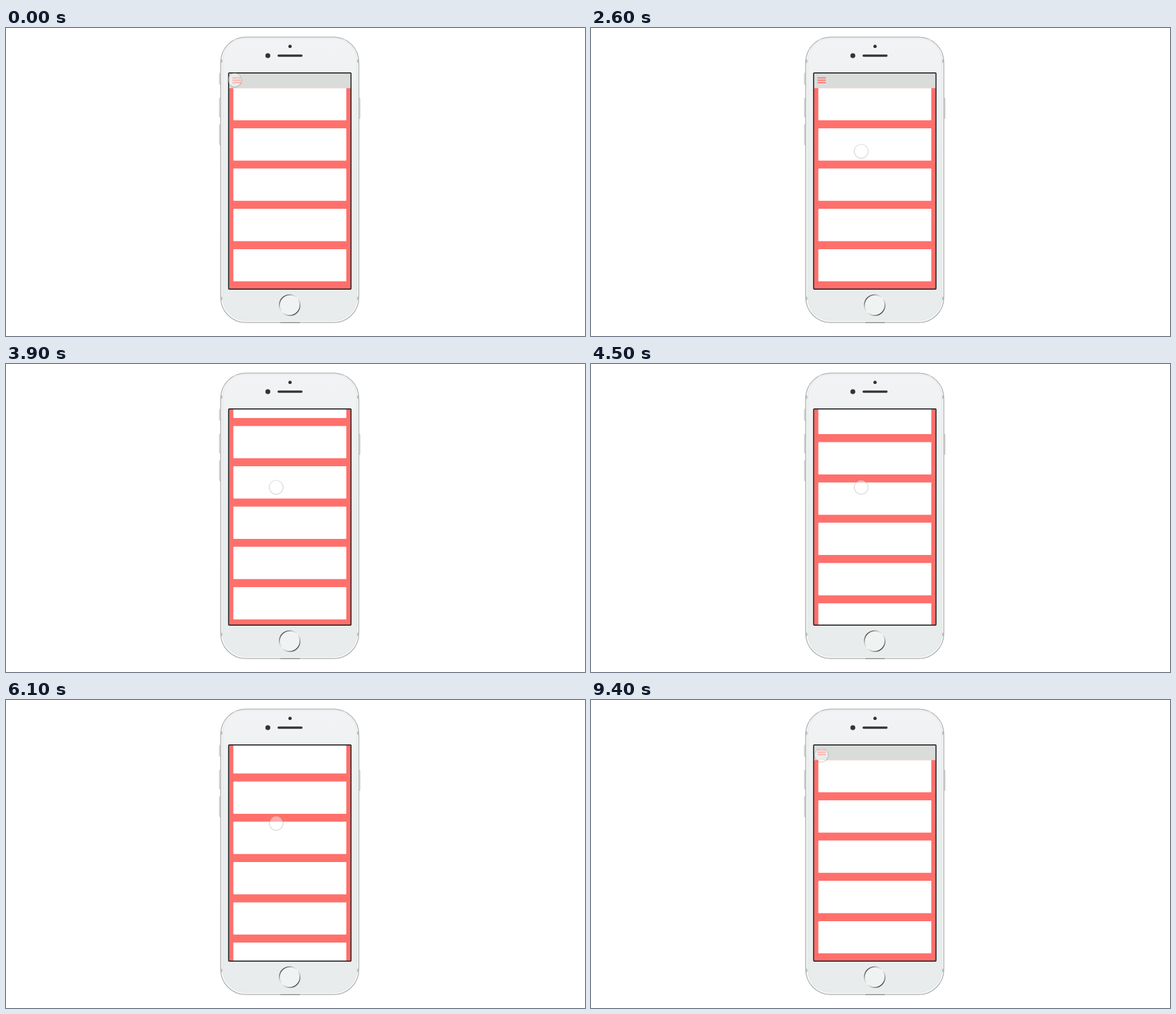
Write an HTML page with a canvas that moves like this. It is 900 by 479 pixels and loops after 9.5 s.

```html
<!DOCTYPE html>
<html lang="en">
<head>
<meta charset="utf-8">
<title>Phone menu</title>
<style>
html, body { margin: 0; width: 100%; height: 100%; overflow: hidden; background: #fff; }
canvas { display: block; }
</style>
</head>
<body>
<canvas id="stage" width="900" height="479"></canvas>
<script>
const ctx = document.getElementById('stage').getContext('2d');
const LOOP = 9500;
const RED = '#ff706c';
const DARK = '#29292b';

// Each track lists [time, value] keys.
const drawerKeys = [[100, 0], [800, 163], [1400, 163], [2050, 0]];
const scrollKeys = [[3000, 0], [3900, 59.5], [5100, 134.5], [5350, 141], [7300, 13.5], [7700, 0]];
const cursorKeys = [[500, 0], [1700, 1], [8750, 1], [9500, 0]];

const ease = p => (1 - Math.cos(Math.PI * p)) / 2;
const linear = p => p;

function valueAt(keys, time, curve) {
  if (time <= keys[0][0]) return keys[0][1];
  for (let i = 1; i < keys.length; i++) {
    const [t0, v0] = keys[i - 1], [t1, v1] = keys[i];
    if (time <= t1) return v0 + (v1 - v0) * curve((time - t0) / (t1 - t0));
  }
  return keys[keys.length - 1][1];
}

function rect(x, y, w, h, color) {
  ctx.fillStyle = color;
  ctx.fillRect(x, y, w, h);
}

function roundRect(x, y, w, h, r, fill, stroke, width = 1) {
  ctx.beginPath();
  ctx.roundRect(x, y, w, h, r);
  if (fill) { ctx.fillStyle = fill; ctx.fill(); }
  if (stroke) { ctx.strokeStyle = stroke; ctx.lineWidth = width; ctx.stroke(); }
}

function circle(x, y, r, fill) {
  ctx.beginPath();
  ctx.arc(x, y, r, 0, Math.PI * 2);
  ctx.fillStyle = fill;
  ctx.fill();
}

function gradient(x0, y0, x1, y1, ...colors) {
  const g = ctx.createLinearGradient(x0, y0, x1, y1);
  colors.forEach((c, i) => g.addColorStop(i / (colors.length - 1), c));
  return g;
}

function drawPhone() {
  for (const [y, h] of [[70, 18], [109, 30], [150, 32]]) {
    roundRect(331.8, y, 3, h, 1, '#e2e3e4', '#b4b5b6', 0.8);
  }
  roundRect(547.2, 109, 3, 32, 1, '#e2e3e4', '#b4b5b6', 0.8);

  roundRect(333.7, 14.2, 214.8, 444, 39, '#f5f6f6', '#aeb0b1', 1.3);
  for (const y of [49, 418]) {
    rect(333.2, y, 3, 5, '#b9bbbc');
    rect(546, y, 3, 5, '#b9bbbc');
  }
  roundRect(337, 16, 208.5, 439, 36, gradient(0, 16, 0, 455, '#f2f3f4', '#e9eced', '#e8ecec'), '#dfe2e2', 0.8);

  circle(441.5, 28.5, 2.6, '#353537');
  circle(407, 43, 3.8, '#343438');
  roundRect(422, 41.2, 39, 3.5, 1.8, '#343436');

  ctx.beginPath();
  ctx.arc(441, 431, 16, 0, Math.PI * 2);
  ctx.fillStyle = '#f1f3f3';
  ctx.fill();
  ctx.strokeStyle = gradient(430, 419, 452, 443, '#555', '#c5c6c6', '#f5f5f5', '#bcbdbd', '#505050');
  ctx.lineWidth = 1.6;
  ctx.stroke();

  for (let x = 427; x < 456; x += 2) rect(x, 457.5, 1.2, 1.5, '#777');
}

function drawPage(shift, scroll) {
  ctx.save();
  ctx.translate(shift, -scroll);
  rect(347, 70, 190, 800, RED);
  for (let i = 0; i < 8; i++) roundRect(353.4, 93.3 + i * 62.65, 175.6, 50.2, 1, '#fff');
  rect(347, 70, 190, 23.5, '#dadcda');
  for (let i = 0; i < 3; i++) rect(352, 76.7 + i * 3.7, 13, 1.7, RED);
  ctx.restore();
}

function drawCursor(progress) {
  const x = 355.5 + 64.5 * progress;
  const y = 80.5 + 110.5 * progress;
  const shade = ctx.createRadialGradient(x, y + 0.8, 9.5, x, y + 0.8, 12);
  shade.addColorStop(0, 'rgba(80,80,80,0)');
  shade.addColorStop(0.45, 'rgba(80,80,80,.24)');
  shade.addColorStop(1, 'rgba(80,80,80,0)');
  circle(x, y + 0.8, 12, shade);
  circle(x, y, 10.4, 'rgba(255,255,255,.42)');
}

function draw(time) {
  rect(0, 0, 900, 479, '#fff');
  drawPhone();
  ctx.save();
  ctx.beginPath();
  ctx.rect(346, 70, 190, 336);
  ctx.clip();
  rect(346, 70, 190, 336, '#f6f7e6');
  drawPage(valueAt(drawerKeys, time, ease), valueAt(scrollKeys, time, linear));
  ctx.restore();
  roundRect(346.1, 69.8, 190.2, 336.3, 1, null, DARK, 1.7);
  drawCursor(valueAt(cursorKeys, time, ease));
}

function tick() {
  draw(performance.now() % LOOP);
  requestAnimationFrame(tick);
}
tick();
</script>
</body>
</html>
```
